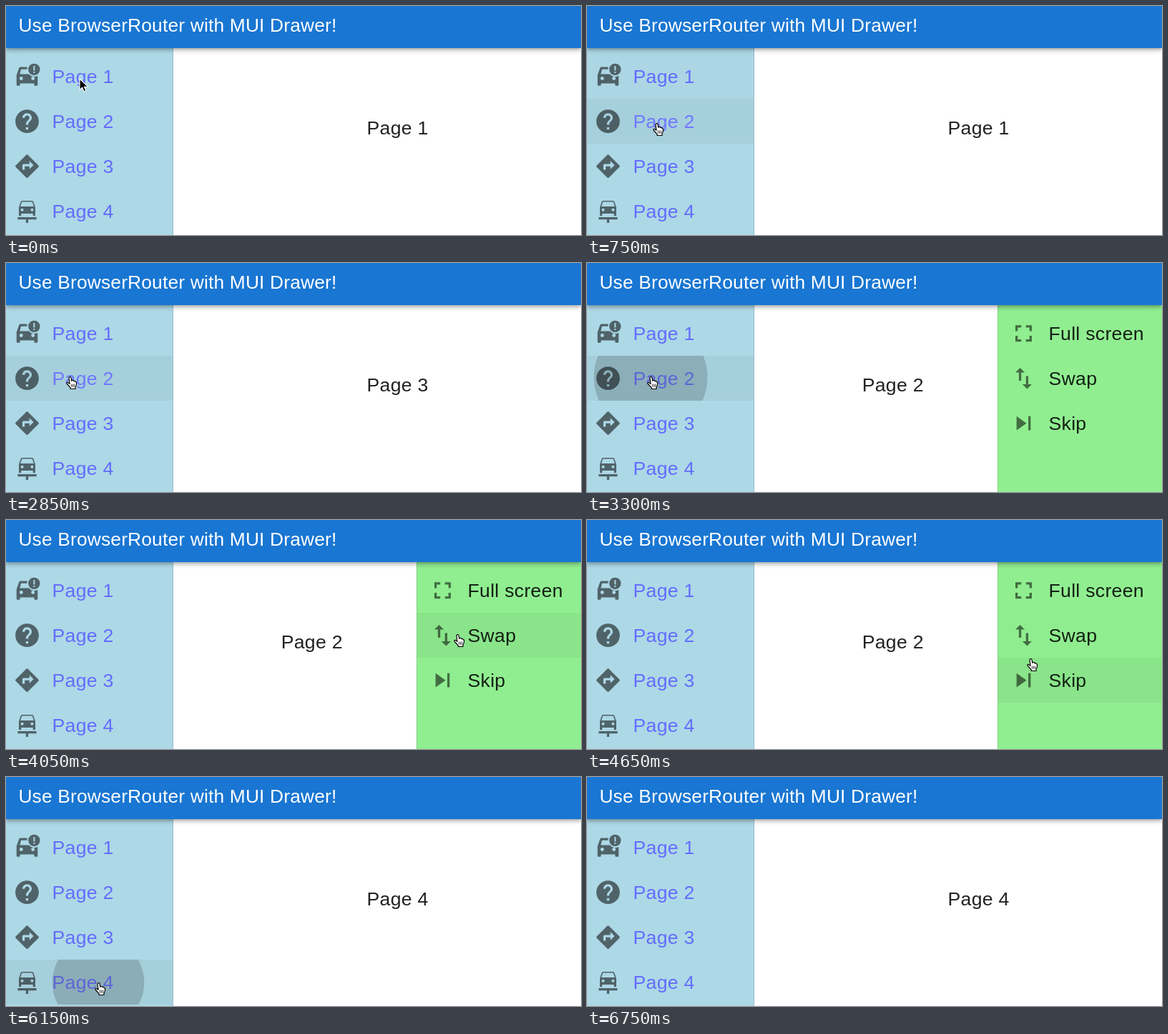
Recreate the animation shown at these times as an HTML page. Size 804 by 321 pixels, loop 7200 ms.

```html
<!DOCTYPE html>
<html lang="en">
<head>
<meta charset="utf-8">
<title>Drawer demo</title>
<style>
  html, body { margin: 0; width: 100%; height: 100%; overflow: hidden; background: #fff; }
  body, text { font-family: "Liberation Sans", Arial, sans-serif; }
  header {
    position: absolute; top: 0; left: 0; width: 804px; height: 59px; box-sizing: border-box;
    padding-left: 17.4px; background: #1976d2; color: #fff;
    font-size: 26.3px; line-height: 55px; letter-spacing: .2px; white-space: nowrap;
    box-shadow: 0 2px 4px -1px rgba(0,0,0,.2), 0 4px 5px rgba(0,0,0,.14), 0 1px 10px rgba(0,0,0,.12);
  }
  svg { position: absolute; top: 0; left: 0; display: block; }
  text { font-size: 26.6px; letter-spacing: .3px; fill: #212121; }
  .link text { fill: #646cff; }
  .link.hover text { fill: #7078ff; }
  .row rect { fill: none; }
  .row.hover rect { fill: rgba(0,0,0,.042); }
  .icon { fill: rgba(0,0,0,.54); fill-rule: evenodd; }
  .actions text { fill: rgba(0,0,0,.87); }
</style>
</head>
<body>
<svg id="stage" width="804" height="321" viewBox="0 0 804 321">
  <text id="page" y="179.5"></text>
  <g class="links">
    <rect y="59" width="234" height="262" fill="#add8e6"/>
    <rect x="233" y="59" width="1" height="262" fill="rgba(0,0,0,.12)"/>
  </g>
  <g class="actions">
    <rect x="574" y="59" width="230" height="262" fill="#90ee90"/>
    <rect x="574" y="59" width="1" height="262" fill="rgba(0,0,0,.12)"/>
  </g>
  <g id="ripples"></g>
  <g id="cursor">
    <path id="arrow" d="M0 0V15.6L3.6 12.2 6 18 8.8 16.8 6.4 11.2H11.4Z" fill="#000" stroke="#fff" stroke-width="1.1"/>
    <g id="hand" transform="translate(-5 -1)" stroke="#000" stroke-linejoin="round" stroke-linecap="round">
      <path fill="#fff" stroke-width="1.2" d="M4 2.3a1.5 1.5 0 0 1 3-.4l.8 4.4.2-.4a1.4 1.4 0 0 1 2.5.3l.2.5a1.3 1.3 0 0 1 2.2.5l.1.5a1.2 1.2 0 0 1 1.6 1c.1 2.8-.3 4.4-1.6 6.4v2.4H6.2v-1.6C4.6 14 3 12 1.1 10.2c-.9-.9.1-2.3 1.4-1.7l2.5 1.8z"/>
      <path fill="none" stroke-width=".8" d="M7.4 11v3.4M9.5 11v3.4M11.6 11v3.4"/>
    </g>
  </g>
</svg>
<header>Use BrowserRouter with MUI Drawer!</header>

<script>
const LOOP = 7200, TICK = 150, TOP = 67, ROW = 63;
const $ = s => document.querySelector(s);

const ICONS = {
  crash: "M18 1a5 5 0 1 0 0 10a5 5 0 0 0 0-10zM17.4 3h1.2v4h-1.2zM17.4 7.9h1.2v1.2h-1.2z" +
    "M12.1 4H6.5c-.66 0-1.21.42-1.42 1.01L3 11v8c0 .55.45 1 1 1h1c.55 0 1-.45 1-1v-1h12v1c0 .55.45 1 1 1h1c.55 0 1-.45 1-1v-7.4" +
    "A6 6 0 0 1 13.6 10H5.8L6.85 6H12A6 6 0 0 1 12.1 4z" +
    "M7 12.2a1.5 1.5 0 1 0 0 3a1.5 1.5 0 0 0 0-3zM17 12.2a1.5 1.5 0 1 0 0 3a1.5 1.5 0 0 0 0-3z",
  help: "M12 2C6.48 2 2 6.48 2 12s4.48 10 10 10 10-4.48 10-10S17.52 2 12 2zm1 17h-2v-2h2v2zm2.07-7.75l-.9.92C13.45 12.9 13 13.5 13 15h-2v-.5c0-1.1.45-2.1 1.17-2.83l1.24-1.26c.37-.36.59-.86.59-1.41 0-1.1-.9-2-2-2s-2 .9-2 2H8c0-2.21 1.79-4 4-4s4 1.79 4 4c0 .88-.36 1.68-.93 2.25z",
  turn: "M21.71 11.29l-9-9c-.39-.39-1.02-.39-1.41 0l-9 9c-.39.39-.39 1.02 0 1.41l9 9c.39.39 1.02.39 1.41 0l9-9c.39-.38.39-1.01 0-1.41zM14 14.5V12h-4v3H8v-4c0-.55.45-1 1-1h5V7.5l3.5 3.5-3.5 3.5z",
  lift: "M16.22 9.56a1.22 1.22 0 1 0 0 2.44a1.22 1.22 0 0 0 0-2.44zM7.78 9.56a1.22 1.22 0 1 0 0 2.44a1.22 1.22 0 0 0 0-2.44z" +
    "M7.61 4L6.28 8h11.43l-1.33-4zM16.28 3s.8 0 1.16 1L19 8.69v6.5c0 .45-.35.81-.78.81h-.44c-.44 0-.78-.36-.78-.81V14H7v1.19c0 .45-.35.81-.78.81h-.44c-.43 0-.78-.36-.78-.81v-6.5L6.55 4C6.9 3 7.71 3 7.71 3z" +
    "M4 17h16v2h-7v3h-2v-3H4z",
  full: "M7 14H5v5h5v-2H7zM5 10h2V7h3V5H5zM17 17h-3v2h5v-5h-2zM14 5v2h3v3h2V5z",
  swap: "M16 17V10h-2v7h-3l4 4 4-4zM9 3L5 7h3v7h2V7h3z",
  skip: "M6 18l8.5-6L6 6zM16 6v12h2V6z"
};

function el(parent, tag, attrs) {
  const node = document.createElementNS("http://www.w3.org/2000/svg", tag);
  for (const key in attrs) node.setAttribute(key, attrs[key]);
  return parent.appendChild(node);
}

function addRow(menu, cls, x, w, i, icon, label) {
  const y = TOP + ROW * i, g = el(menu, "g", { class: "row " + cls });
  el(g, "rect", { x, y, width: w, height: ROW });
  el(g, "path", {
    class: "icon", d: ICONS[icon],
    transform: `translate(${x + (x ? 15.8 : 9.8)} ${y + 12}) scale(1.64)`
  });
  el(g, "text", { x: x + (x ? 70.5 : 64.5), y: y + 41 }).textContent = label;
  return g;
}

const LEFT = { x: 0, w: 233 }, RIGHT = { x: 575, w: 229 };
LEFT.rows = ["crash", "help", "turn", "lift"].map((icon, i) =>
  addRow($(".links"), "link", LEFT.x, LEFT.w, i, icon, "Page " + (i + 1)));
RIGHT.rows = [["full", "Full screen"], ["swap", "Swap"], ["skip", "Skip"]].map(([icon, label], i) =>
  addRow($(".actions"), "", RIGHT.x, RIGHT.w, i, icon, label));

// time, page number
const VISITS = [[0, 1], [1950, 3], [3300, 2], [6150, 4]];

// time, x, y of the pointer's hot spot
const PATH = [
  [0, 103, 102], [600, 103, 102], [750, 97, 165], [900, 91, 224], [1200, 91, 224],
  [1350, 92, 223], [2100, 92, 223], [2400, 91, 284], [2550, 88, 153], [2700, 86, 171],
  [2850, 89, 160], [3450, 89, 160], [3600, 190, 165], [3750, 360, 170], [3900, 540, 166],
  [4050, 631, 161], [4500, 631, 161], [4650, 620, 195], [4800, 605, 230], [5250, 605, 230],
  [5400, 560, 240], [5550, 420, 262], [5850, 160, 288], [6000, 129, 289], [6300, 129, 289],
  [6450, 330, 296], [6600, 693, 303]
];

// press and release times, place
const CLICKS = [
  [250, 330, 104, 103, LEFT], [1716, 1850, 93, 222, LEFT], [3100, 3200, 89, 160, LEFT],
  [4125, 4180, 631, 161, RIGHT], [4845, 4960, 605, 230, RIGHT], [5962, 6090, 129, 288, LEFT]
].map(([down, up, x, y, menu], i) => {
  const row = Math.floor((y - TOP) / ROW), top = TOP + ROW * row;
  const far = (v, start, size) => Math.max(v - start, start + size - v) + 1;
  const clip = el($("#ripples"), "clipPath", { id: "clip" + i });
  el(clip, "rect", { x: menu.x, y: top, width: menu.w, height: ROW });
  const g = el($("#ripples"), "g", { "clip-path": `url(#clip${i})` });
  const dot = el(g, "circle", { cx: x, cy: y, r: 0 });
  return { down, up, dot, radius: Math.hypot(far(x, menu.x, menu.w), far(y, top, ROW)) };
});

// cubic-bezier(.4, 0, .2, 1)
function ease(x) {
  if (x <= 0) return 0;
  if (x >= 1) return 1;
  let lo = 0, hi = 1, s;
  for (let i = 0; i < 24; i++) {
    s = (lo + hi) / 2;
    const v = 1.2 * (1 - s) ** 2 * s + .6 * (1 - s) * s * s + s ** 3;
    if (v < x) lo = s; else hi = s;
  }
  return s * s * (3 - 2 * s);
}

function pointerAt(t) {
  const i = PATH.findIndex(p => p[0] > t);
  if (i < 0) return PATH[PATH.length - 1].slice(1);
  const [t0, x0, y0] = PATH[i - 1], [t1, x1, y1] = PATH[i], k = (t - t0) / (t1 - t0);
  return [Math.round(x0 + (x1 - x0) * k), Math.round(y0 + (y1 - y0) * k)];
}

function show(node, on) { node.style.display = on ? "" : "none"; }

function render(t) {
  const page = VISITS.filter(v => v[0] <= t).pop()[1], split = page === 2;
  $("#page").textContent = "Page " + page;
  $("#page").setAttribute("x", split ? 384.7 : 504.5);
  show($(".actions"), split);

  const [x, y] = pointerAt(t), inside = t < 6750;
  let over = false;
  for (const menu of [LEFT, RIGHT]) {
    const active = inside && t >= 300 && (menu === LEFT || split) && x >= menu.x && x < menu.x + menu.w;
    menu.rows.forEach((row, i) => {
      const hit = active && Math.floor((y - TOP) / ROW) === i;
      row.classList.toggle("hover", hit);
      over = over || hit;
    });
  }
  show($("#cursor"), inside);
  show($("#hand"), over);
  show($("#arrow"), !over);
  $("#cursor").setAttribute("transform", `translate(${x} ${y})`);

  for (const c of CLICKS) {
    const grow = ease((t - c.down) / 550), fade = 1 - ease((t - c.up) / 550);
    c.dot.setAttribute("r", c.radius * grow);
    c.dot.setAttribute("fill-opacity", t < c.down ? 0 : .87 * (.1 + .2 * grow) * fade);
  }
}

function frame() {
  const t = performance.now() % LOOP;
  render(Math.floor(t / TICK) * TICK);
  requestAnimationFrame(frame);
}
frame();
</script>
</body>
</html>
```
